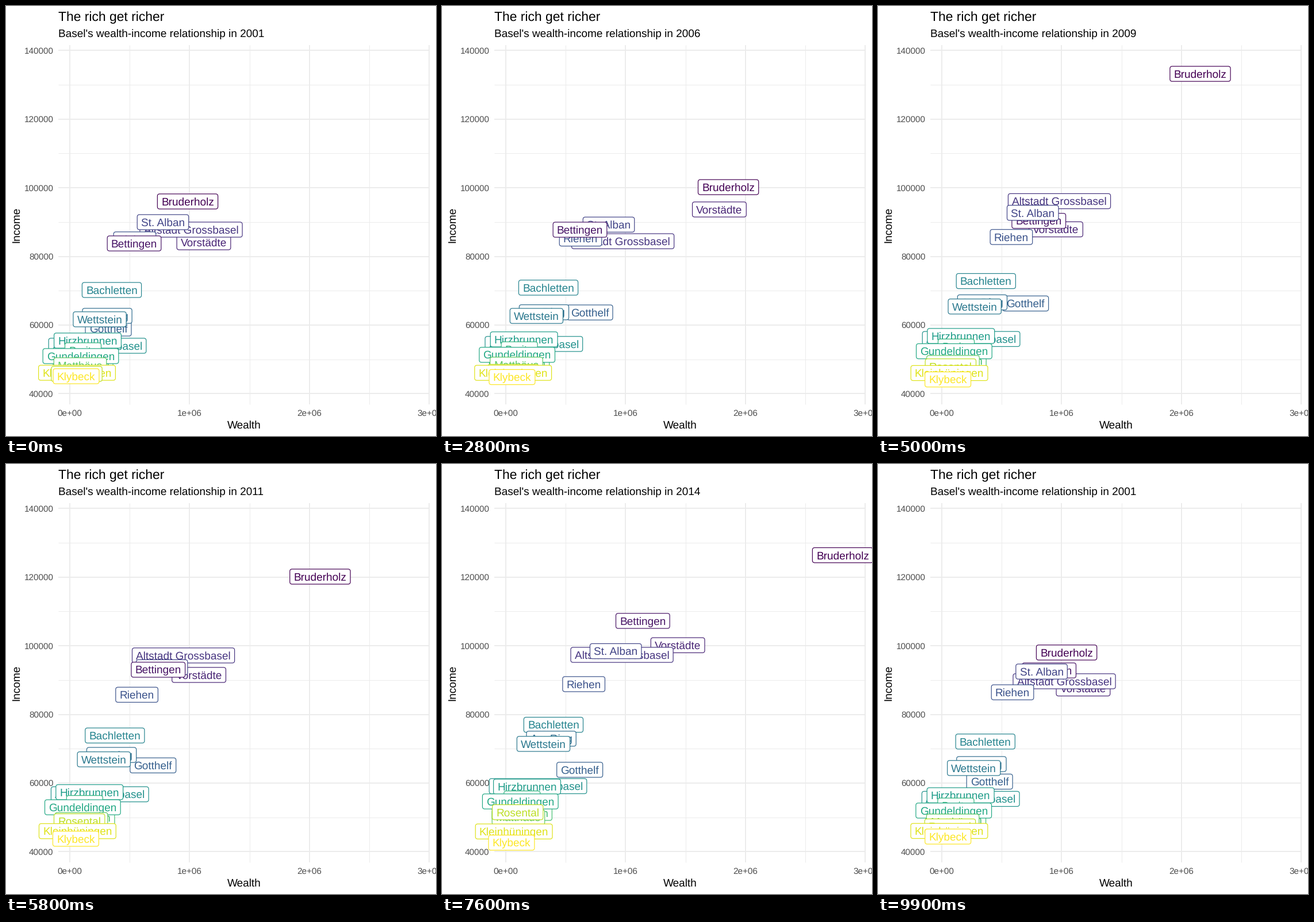
A matplotlib script that plays this animation: 748x748 px, repeating every 10000 ms.

```python
import numpy as np
import matplotlib.pyplot as plt
from matplotlib.animation import FuncAnimation
from matplotlib.patches import FancyBboxPatch

SIZE, FRAMES = 748, 100
START, SPAN = 2001, 17
PT = 0.72  # pixels to points at 100 dpi
YEARS = np.arange(SPAN + 1)

plt.rcParams.update({"font.family": "Liberation Sans", "text.hinting": "none"})

fig = plt.figure(figsize=(SIZE / 100, SIZE / 100), dpi=100, facecolor="white")
ax = fig.add_axes([0, 0, 1, 1])
ax.set_xlim(0, SIZE)
ax.set_ylim(SIZE, 0)
ax.axis("off")


def write(x, y, s, size, color="black", **kw):
    return ax.text(x, y, s, fontsize=size * PT, color=color, va="baseline", **kw)


def grid_line(xs, ys, major):
    ax.plot(xs, ys, color="#ebebeb", lw=(1.85 if major else 0.95) * PT,
            zorder=1, solid_capstyle="butt")


def tick(x, y, s, ha):
    write(x, y, s, 15.2, "#4d4d4d", ha=ha, zorder=100)


for k in range(7):
    x = 111 + k * 104.25
    grid_line([x, x], [68, 693], k % 2 == 0)
    if k % 2 == 0:
        tick(x, 713.3, f"{k // 2}e+0{6 if k else 0}", "center")
for k in range(11):
    y = 674.3 - k * 59.7
    grid_line([91, 737.5], [y, y], k % 2 == 0)
    if k % 2 == 0:
        tick(82.5, y + 5.4, str(40000 + k * 10000), "right")

write(91, 26.3, "The rich get richer", 22.9)
subtitle = write(91, 54.3, "", 19)
write(414.5, 735, "Wealth", 19, ha="center")
write(23, 380.5, "Income", 19, ha="center", rotation=90, rotation_mode="anchor")


class Area:
    """A name tag on a closed path; the poorer it is, the nearer the front."""

    def __init__(self, name, shade, xs, ys):
        self.xs, self.ys = xs, ys
        color = plt.get_cmap("viridis")(shade / 20)
        self.text = write(0, 0, name, 19, color, ha="center")
        self.w = self.text.get_window_extent().width + 13.4
        self.box = FancyBboxPatch(
            (0, 0), self.w, 26.2, boxstyle="round,pad=0,rounding_size=4",
            fc="white", ec=color, lw=1.2 * PT)
        ax.add_patch(self.box)

    def place(self, t):
        x, y = np.interp(t, YEARS, self.xs), np.interp(t, YEARS, self.ys)
        z = 10 + (SIZE - x) / 10
        self.box.set_bounds(x - self.w / 2, y - 13.1, self.w, 26.2)
        self.box.set_zorder(z)
        self.text.set_position((x, y + 6.7))
        self.text.set_zorder(z + 1e-5)


def volatile(*stops):
    """Straight runs between (year, x, y) stops, then back to the first."""
    t, x, y = zip(*stops, (SPAN, *stops[0][1:]))
    return np.interp(YEARS, t, x), np.interp(YEARS, t, y)


def steady(x, y, rise):
    """Slow growth that speeds up, then back to the start."""
    g = (YEARS / (SPAN - 1)) ** 2.3
    g[-1] = 0
    return x + (3 + 0.2 * rise) * g, y - rise * g


# Rich to poor, which is also the order of the colours
paths = {
    "Bruderholz": volatile(
        (0, 316, 340), (2, 302, 366), (4, 546, 325), (5, 483, 312),
        (8, 600, 96), (9, 521, 140), (11, 580, 270), (12, 582, 258),
        (13, 707, 150), (14, 632, 178), (15, 643, 186), (16, 387, 269)),
    "Bettingen": volatile(
        (0, 223, 413), (3, 218, 412), (5, 243, 386), (9, 285, 372),
        (11, 238, 339), (12, 238, 335), (14, 480, 200), (15, 610, 111),
        (16, 662, 96)),
    "Vorstädte": volatile(
        (0, 344, 411), (2, 418, 399), (5, 488, 350), (9, 284, 394),
        (11, 404, 331), (16, 420, 290)),
    "Altstadt Grossbasel": volatile(
        (0, 322, 389), (2, 264, 446), (5, 319, 406), (9, 315, 330),
        (11, 300, 337), (16, 334, 324)),
    "St. Alban": volatile(
        (0, 273, 376), (2, 267, 395), (5, 292, 379), (9, 266, 357),
        (11, 278, 349), (16, 341, 288)),
    "Riehen": volatile(
        (0, 224, 406), (2, 218, 422), (5, 243, 403), (11, 224, 401),
        (16, 283, 354)),
    "Gotthelf": volatile(
        (0, 178, 561), (2, 200, 546), (5, 262, 532), (8, 257, 515),
        (11, 255, 530), (15, 223, 534), (16, 273, 511)),
    "Am Ring": steady(176, 539, 100),
    "Wettstein": steady(163, 545, 95),
    "Bachletten": steady(184, 494, 66),
    "Altstadt Kleinbasel": steady(159, 591, 50),
    "Hirzbrunnen": steady(142, 582, 34),
    "Gundeldingen": steady(130, 609, 36),
    "Breite": steady(134, 599, 28),
    "St. Johann": steady(134, 624, 28),
    "Matthäus": steady(129, 625, 17),
    "Clara": steady(130, 632, 30),
    "Iselin": steady(131, 630, 22),
    "Rosental": steady(123, 640, 56),
    "Kleinhüningen": steady(123.5, 638, -2),
    "Klybeck": steady(122, 644, -24),
}
areas = [Area(name, i, *path) for i, (name, path) in enumerate(paths.items())]


def update(i):
    t = i * SPAN / FRAMES
    year = START + int(np.ceil(t - 0.5)) % SPAN
    subtitle.set_text(f"Basel's wealth-income relationship in {year}")
    for area in areas:
        area.place(t)
    return []


anim = FuncAnimation(fig, update, frames=FRAMES, interval=100,
                     init_func=lambda: update(0), repeat=True, repeat_delay=0)
plt.show()
```
